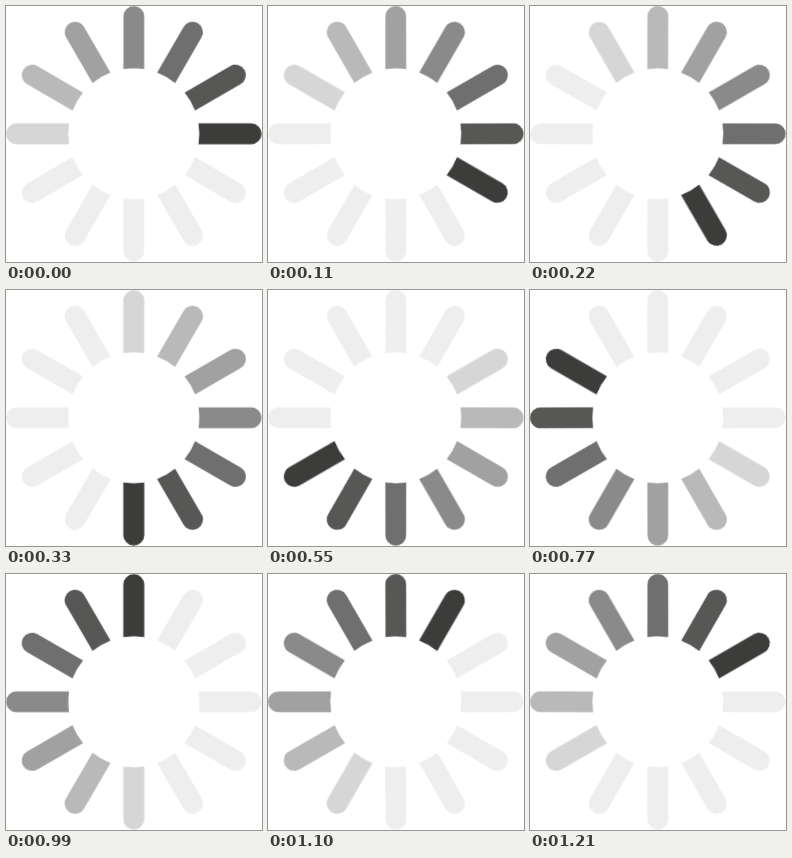
Write an HTML page without scripts that moves like this. It is 256 px wide and 256 px high and loops after 1320 ms.

```html
<!DOCTYPE html>
<html lang="en">
<head>
<meta charset="utf-8">
<title>Loading spinner</title>
<style>
  html, body { margin: 0; width: 100%; height: 100%; overflow: hidden; background: #fff; }
  svg { display: block; width: 100vw; height: 100vh; }
  .wheel { fill: #eee; animation: turn 1320ms steps(12) infinite; }
  @keyframes turn { to { transform: rotate(360deg); } }
</style>
</head>
<body>
<svg viewBox="0 0 256 256">
  <defs>
    <path id="bar" d="M64.7-10.4H117.4a10.4 10.4 0 0 1 0 20.8H64.7A65.5 65.5 0 0 0 64.7-10.4z"/>
  </defs>
  <g transform="translate(127.8 127.8)">
    <g class="wheel">
      <use href="#bar" fill="#3c3c3b"/>
      <use href="#bar" fill="#575756" transform="rotate(-30)"/>
      <use href="#bar" fill="#706f6f" transform="rotate(-60)"/>
      <use href="#bar" fill="#8a8a8a" transform="rotate(-90)"/>
      <use href="#bar" fill="#a1a1a1" transform="rotate(-120)"/>
      <use href="#bar" fill="#b9b9b9" transform="rotate(-150)"/>
      <use href="#bar" fill="#d6d6d6" transform="rotate(180)"/>
      <use href="#bar" transform="rotate(150)"/>
      <use href="#bar" transform="rotate(120)"/>
      <use href="#bar" transform="rotate(90)"/>
      <use href="#bar" transform="rotate(60)"/>
      <use href="#bar" transform="rotate(30)"/>
    </g>
  </g>
</svg>
</body>
</html>
```
